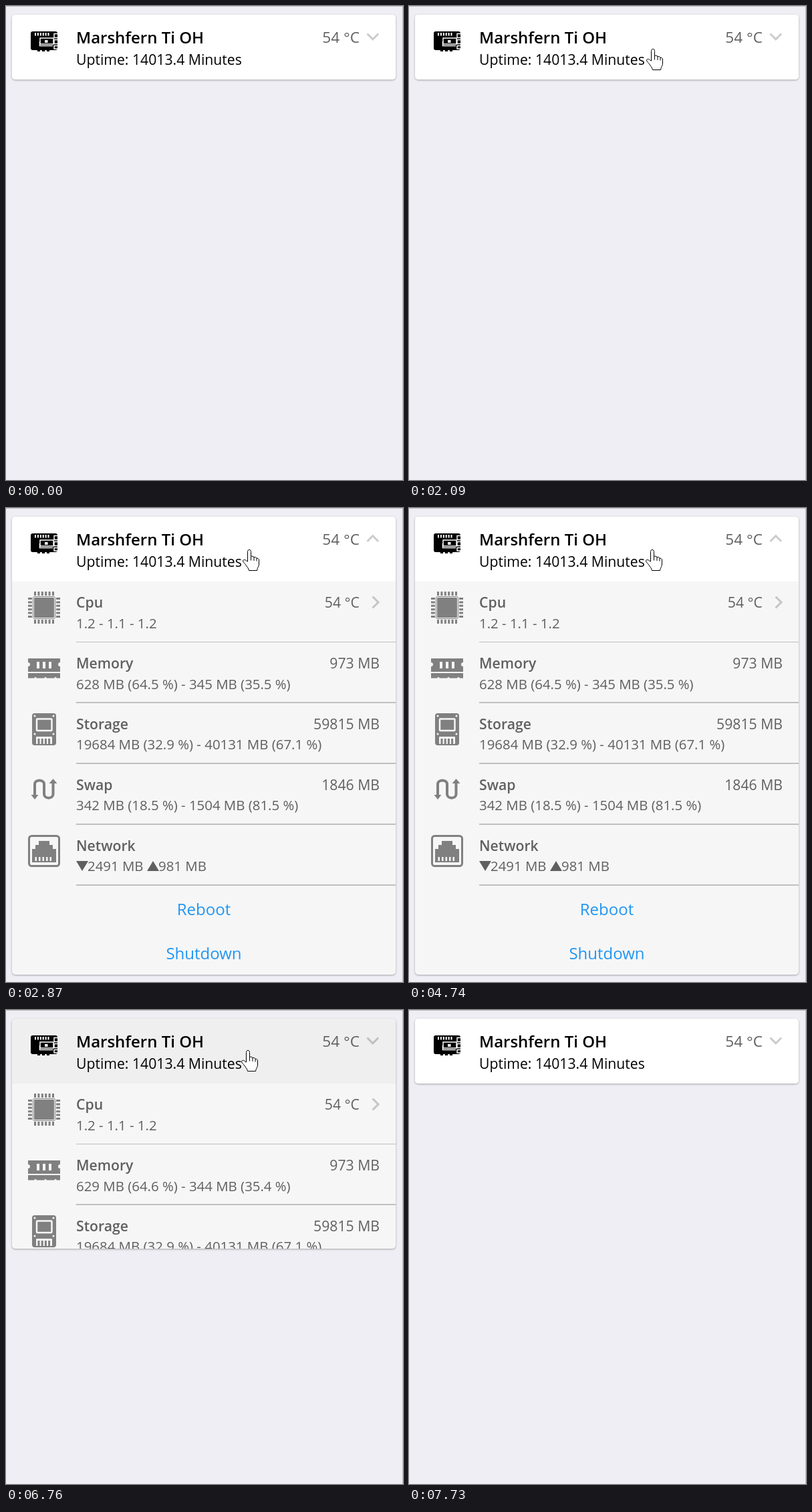
Recreate the animation shown at these times as an HTML page. Size 594 by 709 pixels, loop 8 s.

```html
<!DOCTYPE html>
<html lang="en">
<head>
<meta charset="utf-8">
<title>Device status</title>
<style>
html, body { margin: 0; width: 100%; height: 100%; overflow: hidden; background: #efeef4; }
#frame { position: absolute; inset: 0; border: solid #bebebe; border-width: 1px 1px 0 0; }
#card { position: absolute; left: 9px; top: 13px; width: 574px; overflow: hidden;
  border-radius: 5px; background: #f6f6f6; box-shadow: 0 1px 3px rgba(0,0,0,.32); }
svg { position: absolute; left: 0; top: 0; display: block; }
text { font: 21.2px "Open Sans", "Noto Sans", sans-serif; fill: #606060; }
.title { font-size: 24px; font-weight: 600; fill: #000; }
.name { font-weight: 600; }
.sub { font-size: 20.4px; }
.end { text-anchor: end; }
.button { font-size: 24px; text-anchor: middle; fill: #2196f3; }
.chevron { fill: none; stroke: #000; stroke-opacity: .2; stroke-width: 3; }
.icon { fill: #808080; stroke: none; }
.hole { fill: #f6f6f6; }
.line { fill: none; stroke: #808080; }
.gap { fill: none; stroke: #f6f6f6; }
.pointer { fill: #fff; stroke: #000; stroke-linejoin: round; }
</style>
</head>
<body>
<div id="frame"></div>
<div id="card">
<svg width="574" height="685" viewBox="9 13 574 685">
  <rect x="9" y="13" width="574" height="97" fill="#fff"/>
  <rect id="press" x="9" y="13" width="574" height="97"/>
  <g id="board">
    <rect x="37" y="38" width="40" height="28" rx="3"/>
    <path d="M47 66h4v2h-4zM54 66h4v2h-4zM61 66h4v2h-4z"/>
    <g fill="none" stroke="#fff">
      <path d="M43 42.2H65" stroke-width="4.4" stroke-dasharray="2 1.9"/>
      <path d="M50.5 53V59.5H70M51 48H71V57H51Z" stroke-width="1.5"/>
      <path d="M77 41.5H72V47.5H77M77 50.5H72V56.5H77M77 59.5H72V64H77" stroke-width="1.5"/>
    </g>
    <rect x="58" y="51" width="4.5" height="4" fill="#fff"/>
  </g>
  <text class="title" x="105" y="56">Marshfern Ti OH</text>
  <text x="105" y="88" style="fill:#000">Uptime: 14013.4 Minutes</text>
  <text class="end" x="529" y="55" style="font-size:22.6px">54 °C</text>
  <path id="arrow" class="chevron"/>
  <g id="rows"></g>
  <text class="button" x="296" y="609">Reboot</text>
  <text class="button" x="296" y="675">Shutdown</text>
</svg>
</div>
<svg width="594" height="709">
  <path id="pointer" class="pointer"/>
</svg>
<script>
const $ = id => document.getElementById(id);

// Icons are drawn for rows spaced 91px apart, in stage coordinates.
const icons = [
  `<rect class="line" x="40.5" y="132.5" width="33" height="33" rx="2"/>
   <rect x="42" y="134" width="30" height="30" rx="1"/>
   <path class="line" stroke-width="6" stroke-dasharray="3 2.4"
     d="M42 128H72.5M42 170H72.5M36 134V164.5M78 134V164.5"/>`,
  `<path d="M33 225H81V231a3 3 0 0 0 0 6V245H33V237a3 3 0 0 0 0-6Z"/>
   <path d="M33 247H81V254.5H76L74 252.5 72 254.5H61L59 252.5 57 254.5H46L44 252.5 42 254.5H33Z"/>
   <path class="gap" stroke-width="10" stroke-dasharray="4 5" d="M46 235H68"/>`,
  `<rect x="39" y="307" width="36" height="48" rx="4"/>
   <rect class="gap" x="46" y="315.5" width="22.5" height="17.5" rx="1" stroke-width="2.5"/>
   <g class="hole"><circle cx="43" cy="311" r="1.5"/><circle cx="71" cy="311" r="1.5"/>
   <circle cx="43" cy="338" r="1.5"/><circle cx="71" cy="338" r="1.5"/>
   <rect x="45" y="342" width="24" height="11" rx="1"/></g>
   <path class="line" stroke-width="8" stroke-dasharray="3 2.2" d="M47.5 349H67"/>`,
  `<path class="line" stroke-width="4"
     d="M43 431V413C43 405.5 57 405.5 57 413V428C57 435.5 70.5 435.5 70.5 428V410"/>
   <path d="M37.5 429H48.5L43 436ZM64.5 412H76.5L70.5 405Z"/>`,
  `<rect class="line" x="34.5" y="490.5" width="45" height="45" rx="4" stroke-width="3"/>
   <path d="M39 530V510H44V504H49V498H65V504H70V510H75V530Z"/>
   <path class="gap" stroke-width="6" stroke-dasharray="2.5 3" d="M43.5 525H71"/>`
];

const rows = [
  ["Cpu", "54 °C", "1.2 - 1.1 - 1.2"],
  ["Memory", "973 MB", ""],
  ["Storage", "59815 MB", "19684 MB (32.9 %) - 40131 MB (67.1 %)"],
  ["Swap", "1846 MB", "342 MB (18.5 %) - 1504 MB (81.5 %)"],
  ["Network", "", ""]
];

$("rows").innerHTML = rows.map(([name, value, sub], i) => {
  const y = 149 + 91 * i;
  return `<g class="icon">${icons[i]}</g>
    <text class="name" x="105" y="${y}">${name}</text>
    <text class="end" x="${i ? 559 : 529}" y="${y}">${value}</text>
    <text class="sub" id="sub${i}" x="105" y="${y + 31 - (i > 1)}">${sub}</text>
    <rect x="105" y="${y + 51 - (i > 0)}" width="478" height="${i ? 2 : 1}" fill="#c0c0c0"/>`;
}).join("") + `
  <path class="chevron" d="M548.5 132.5l8.5 8.5-8.5 8.5"/>
  <path fill="#606060" d="M105 528h18l-9 15zM211 543h18l-9-15z"/>
  <text class="sub" x="122" y="543">2491 MB</text>
  <text class="sub" x="228" y="543">981 MB</text>`;

const ARROW = "M.5 .5V24.5L6 19.2 9.5 27 13.2 25.4 9.7 17.8H17.5Z";
const HAND = "M-1.5 18V3.5C-1.5-.7 3.5-.7 3.5 3.5V11C4 9.5 8 9.8 8 12" +
  "C9 10.8 12 11.5 12 13.5C13 12.5 15.5 13.5 15.5 16V22C15.5 26 13 27 12.5 31.5" +
  "H.5C0 28-3 25-5.5 21.5C-7 19.5-8.5 18.5-8.5 17C-8 14.8-4.5 15-3.5 17Z" +
  "M3.5 11V16.5M8 12V17M12 13.5V17.5";

// Pointer track: time, x, y of the hot spot
const track = [
  [990, 481, 692], [1200, 480, 528], [1400, 445, 342], [1610, 402, 183], [1750, 378, 105],
  [1890, 366, 70], [2090, 363, 62], [4740, 363, 62], [4870, 362, 61], [5200, 362, 61],
  [5210, 361, 60], [7040, 361, 60], [7180, 367, 98], [7250, 378, 136], [7320, 411, 193],
  [7390, 440, 275], [7460, 476, 388], [7530, 510, 511], [7600, 549, 621], [7670, 564, 692]
];
const PRESS = [2490, 6550], RELEASE = [2560, 6666], LENGTH = 280;

const clamp = v => Math.max(0, Math.min(1, v));

// The CSS "ease" curve, solved by bisection
function ease(x) {
  let lo = 0, hi = 1;
  for (let i = 0; i < 24; i++) {
    const s = (lo + hi) / 2;
    if (.75 * s * (1 - s) + s ** 3 < x) lo = s; else hi = s;
  }
  return .3 * lo * (1 - lo) ** 2 + 3 * lo * lo * (1 - lo) + lo ** 3;
}

function pointerAt(t) {
  let i = 1;
  while (i < track.length - 1 && track[i][0] < t) i++;
  const [a, b] = [track[i - 1], track[i]], k = clamp((t - a[0]) / (b[0] - a[0]));
  return [1, 2].map(n => Math.round(a[n] + (b[n] - a[n]) * k));
}

function draw(time) {
  // The screen refreshes every 70 ms.
  const phase = time < 2300 ? 0 : 40;
  const t = Math.floor((time - phase) / 70) * 70 + phase;
  const [opened, closed] = RELEASE.map(r => ease(clamp((t - r) / LENGTH)));

  $("card").style.height = 97 + 588 * (opened - closed) + "px";
  const second = t >= PRESS[1];
  const fade = second ? closed : opened;
  $("press").setAttribute("opacity", t < PRESS[0] ? 0 : .15 * (1 - fade));
  const up = t > RELEASE[0] && t < RELEASE[1];
  $("arrow").setAttribute("d", up ? "M540.5 50l8.3-8.3 8.3 8.3" : "M540.5 41.5l8.3 8.3 8.3-8.3");
  $("sub1").textContent = second ? "629 MB (64.6 %) - 344 MB (35.4 %)"
    : `628 MB (64.5 %) - 345 MB (${t >= 6480 ? 35.4 : 35.5} %)`;

  const [x, y] = pointerAt(t), pointer = $("pointer");
  pointer.setAttribute("visibility", time >= 990 && time < 7730 ? "visible" : "hidden");
  pointer.setAttribute("d", y < 110 ? HAND : ARROW);
  pointer.setAttribute("transform", `translate(${x} ${y})`);
}

const start = performance.now();
function tick() {
  draw((performance.now() - start) % 8000);
  requestAnimationFrame(tick);
}
tick();
</script>
</body>
</html>
```
